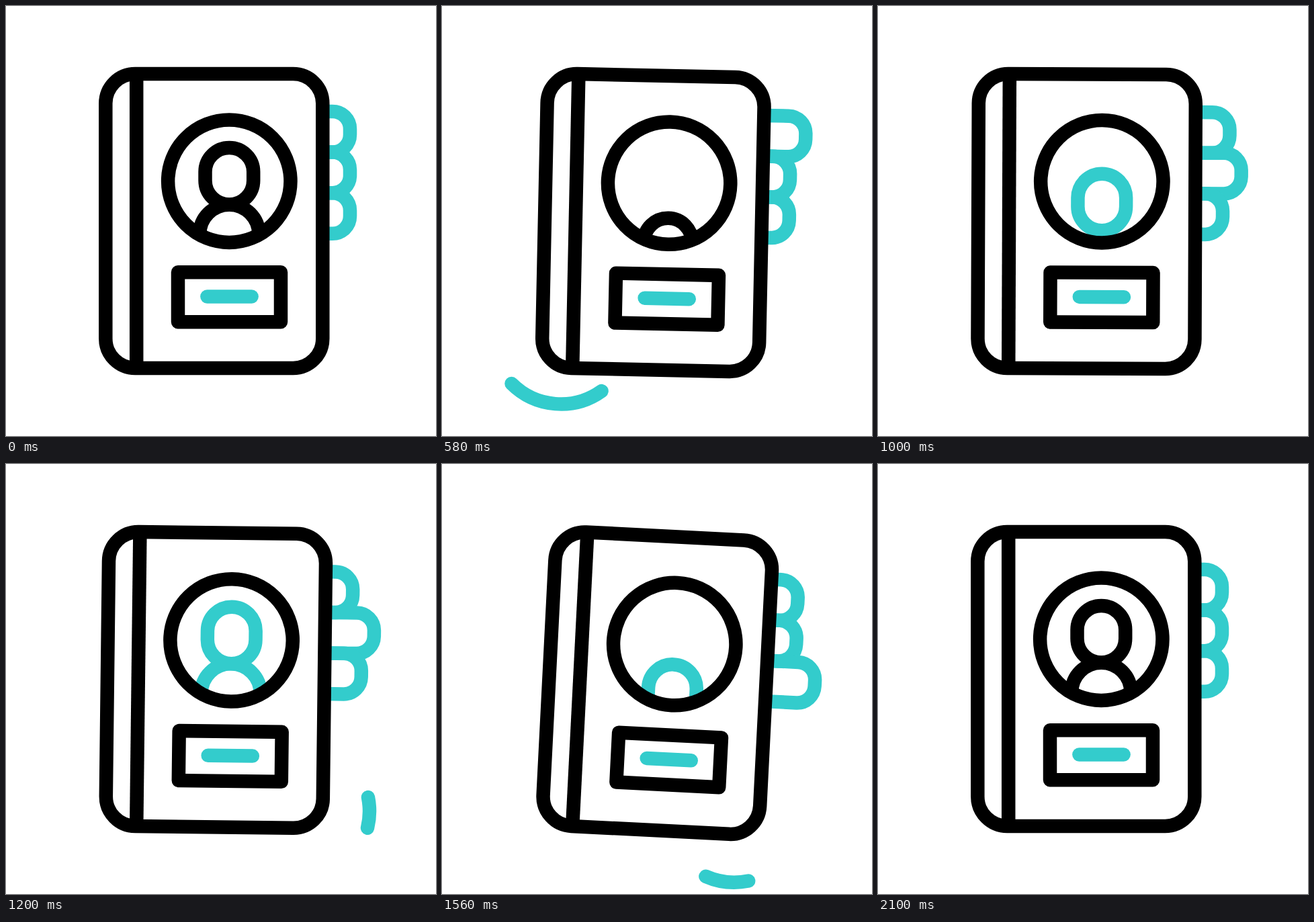
An HTML page for the animation above (3.2 s loop, 640 by 640 pixels).

```html
<!DOCTYPE html>
<html lang="en">
<head>
<meta charset="utf-8">
<title>Contact book</title>
<style>
  html, body { margin: 0; width: 100%; height: 100%; overflow: hidden; background: #fff; }
  svg { display: block; width: 100%; height: 100%; fill: none; stroke: #000; stroke-width: 20.5; }
  .teal { stroke: #33cccc; }
  .round { stroke-linecap: round; stroke-linejoin: round; }
</style>
</head>
<body>
<svg viewBox="0 0 640 640">
  <clipPath id="disc"><circle cx="332.3" cy="260.7" r="86"/></clipPath>
  <path class="teal round swoosh"/>
  <path class="teal round swoosh"/>
  <g id="book">
    <path class="teal tab"/>
    <path class="teal tab"/>
    <path class="teal tab"/>
    <rect x="148.3" y="101" width="323" height="438" rx="44"/>
    <path d="M194.2 101V539"/>
    <g clip-path="url(#disc)">
      <g id="person">
        <rect id="head" x="296.5" y="211" width="71.7" height="84.5" rx="35.8"/>
        <circle id="body" cx="332.3" cy="339.7" r="44"/>
      </g>
    </g>
    <circle cx="332.3" cy="260.7" r="91.2"/>
    <rect class="round" x="256" y="396.3" width="153" height="74"/>
    <path class="teal round" d="M299.4 432.5H365.6"/>
  </g>
</svg>
<script>
const LOOP = 3200, SWING = 2.92, BEAT = 223, SWING_START = 215, DROP = 150;
const $ = s => document.querySelector(s);
const all = s => [...document.querySelectorAll(s)];
const book = $('#book'), person = $('#person'), head = $('#head'), body = $('#body');
const tabs = all('.tab'), swooshes = all('.swoosh');

// Eased progress 0..1 between times a and b
const ease = (t, a, b) => {
  const x = Math.min(1, Math.max(0, (t - a) / (b - a)));
  return x * x * (3 - 2 * x);
};

// Tilt passes through 0, -1, 1, -1, 1, -1, 1, 0
function tilt(t) {
  const key = k => k < 1 || k > 6 ? 0 : k % 2 ? -1 : 1;
  const k = Math.floor((t - SWING_START) / BEAT), from = SWING_START + k * BEAT;
  return SWING * (key(k) + (key(k + 1) - key(k)) * ease(t, from, from + BEAT));
}

const tabMoves = [
  { start: 230, peak: 715, end: 1205, reach: 27 },
  { start: 640, peak: 1140, end: 1610, reach: 34 },
  { start: 980, peak: 1480, end: 1980, reach: 34 }
];

function drawTab(el, i, t) {
  const m = tabMoves[i];
  const out = m.reach * (ease(t, m.start, m.peak) - ease(t, m.peak, m.end));
  el.setAttribute('d', `M471 ${157 + i * 60.6}H${486 + out}a26 26 0 0 1 26 26v8.6a26 26 0 0 1 -26 26H471`);
}

const arcs = [
  { x: 177, y: 488.5, r: 104, from: 182, to: 54.4, start: 240 },
  { x: 435, y: 516.7, r: 106, from: -11.3, to: 113.7, start: 1115 }
];

function drawSwoosh(el, i, t) {
  const a = arcs[i], s = t - a.start;
  const tip = ease(s, 0, 300), tail = ease(s, 160, 600);
  const point = f => {
    const w = (a.from + (a.to - a.from) * f) * Math.PI / 180;
    return `${a.x + a.r * Math.cos(w)} ${a.y + a.r * Math.sin(w)}`;
  };
  el.style.display = tip > tail ? '' : 'none';
  el.setAttribute('d', `M${point(tail)}A${a.r} ${a.r} 0 0 ${a.to > a.from ? 1 : 0} ${point(tip)}`);
}

// Down, up in teal, down again, up in black; the body rises after the head
function drop(t, lag) {
  return DROP * (ease(t, 374, 707) - ease(t, 800 + lag, 1100 + lag)
    + ease(t, 1387, 1720) - ease(t, 1735 + lag, 2035 + lag));
}

function draw(t) {
  book.setAttribute('transform', `rotate(${tilt(t)} 194 539)`);
  tabs.forEach((el, i) => drawTab(el, i, t));
  swooshes.forEach((el, i) => drawSwoosh(el, i, t));
  person.setAttribute('class', t > 750 && t < 1728 ? 'teal' : '');
  head.setAttribute('transform', `translate(0 ${drop(t, 0)})`);
  body.setAttribute('transform', `translate(0 ${drop(t, 67)})`);
}

const begin = performance.now();
function frame() {
  draw((performance.now() - begin) % LOOP);
  requestAnimationFrame(frame);
}
frame();
</script>
</body>
</html>
```
